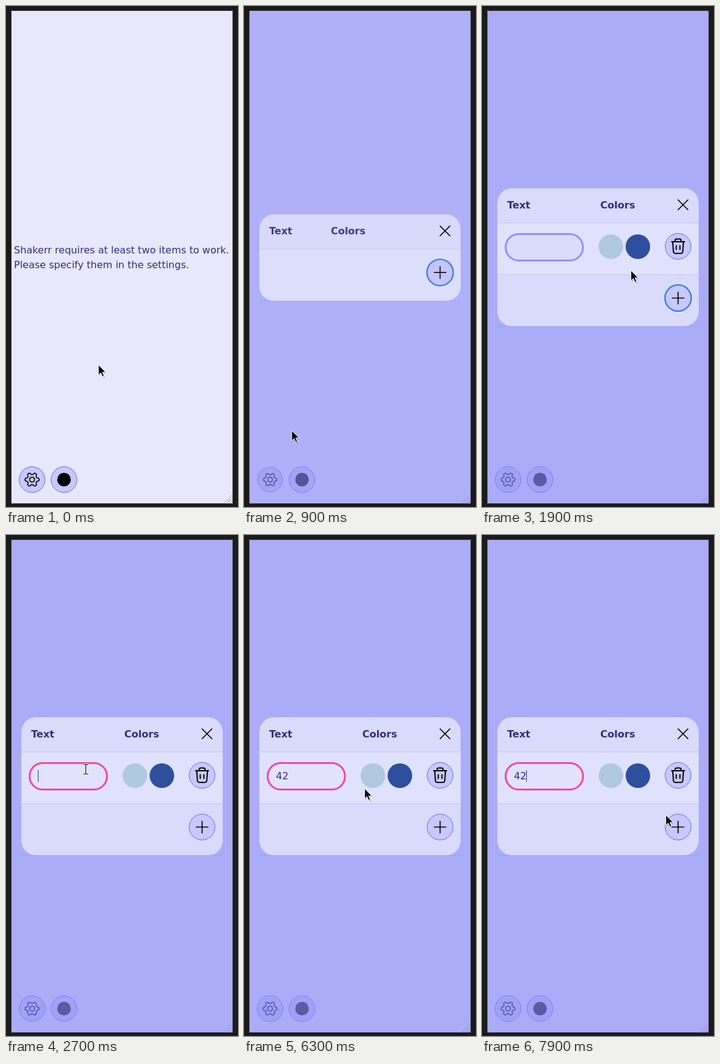
An HTML page that plays this animation: 378 px wide and 814 px high, repeating every 8000 ms.

```html
<!DOCTYPE html>
<html lang="en">
<head>
<meta charset="utf-8">
<title>Settings dialog</title>
<style>
  html, body { margin: 0; width: 100%; height: 100%; overflow: hidden; background: #1b1b1b; }
  svg { display: block; width: 100%; height: 100%; }
  text { font: 16px "DejaVu Sans", sans-serif; fill: #312e81; white-space: pre; }
  .head { font-weight: bold; }
  .btn { fill: #c7c8fd; stroke: #6366f1; }
  .icon { fill: none; stroke: #000; stroke-width: 1.7; stroke-linecap: round; stroke-linejoin: round; }
  .rule { stroke: #c3c4fa; }
  .field { fill: #dadbfd; stroke: #8e92f2; stroke-width: 3; }
  #focus { fill: #e2e2fd; stroke: #f54a9d; }
</style>
</head>
<body>
<svg viewBox="0 0 378 814">
  <defs>
    <clipPath id="card"><rect id="cardShape" x="25" width="328" rx="24"/></clipPath>
    <path id="beamShape" d="M-4-8H-1.500L0-7L1.500-8H4M0-7V7M-4 8H-1.500L0 7L1.500 8H4"/>
    <rect id="pill" x="38.500" y="370.500" width="126" height="43" rx="21.500"/>
  </defs>
  <rect width="378" height="814" fill="#1b1b1b"/>
  <rect x="8.5" y="7.5" width="361" height="801" fill="#e7e8fc" stroke="#38383b"/>

  <g id="notice">
    <text x="13" y="402">Shakerr requires at least two items to work.</text>
    <text x="13" y="426">Please specify them in the settings.</text>
  </g>
  <g id="gearBtn">
    <circle class="btn" r="21"/>
    <path id="gear" class="icon"/>
    <circle class="icon" r="4"/>
  </g>
  <g transform="translate(94.5 769.5)">
    <circle class="btn" r="21"/>
    <circle r="11" fill="#000"/>
  </g>
  <path d="M356 807l12-12M361 807l7-7M365 807l3-3" stroke="#9c9ca8" fill="none"/>
  <rect id="veil" x="9" y="8" width="360" height="800" fill="#8b8cf6"/>

  <g id="dialog">
    <path id="foot" d="M25 .5H353" stroke="#9fa1f3"/>
    <g clip-path="url(#card)">
      <rect id="back" x="25" width="328" fill="#d9dafc"/>
      <rect id="light" x="25" width="328" height="84" fill="#e0e1fc"/>
      <path id="rule1" class="rule" d="M25 .5H353"/>
      <path id="rule2" class="rule" d="M25 .5H353"/>
      <rect id="glow" x="25" width="328" fill="#fff"/>
    </g>
    <g id="header">
      <text class="head" x="41" y="33">Text</text>
      <text id="colors" class="head" y="33">Colors</text>
      <path class="icon" d="M319.500 19l16 16m0-16l-16 16"/>
    </g>
    <g id="item">
      <use href="#pill" class="field"/>
      <use href="#pill" class="field" id="focus"/>
      <text id="value" x="52" y="397"></text>
      <path id="caret" d="M.5 382V401" stroke="#312e81"/>
      <circle cx="210" cy="391" r="20" fill="#b0c8e2"/>
      <circle cx="254" cy="391" r="20" fill="#2e4f9e"/>
      <circle class="btn" cx="319.500" cy="390.500" r="21"/>
      <path class="icon" style="stroke-width:2" d="M309 383H330M314.500 383V381.500a3 3 0 0 1 3-3h4a3 3 0 0 1 3 3V383M310.800 383l1 15.500a3.500 3.500 0 0 0 3.500 3.500h8.400a3.500 3.500 0 0 0 3.500-3.500l1-15.500M316.500 389.500v6M322.500 389.500v6"/>
    </g>
    <g id="plus">
      <circle class="btn" r="21"/>
      <g id="ring" fill="none">
        <circle r="23" stroke="#fff"/>
        <circle r="21.500" stroke="#3f7fe6" stroke-width="2.600"/>
      </g>
      <path class="icon" d="M-9.500 0H9.500M0-9.500V9.500"/>
    </g>
  </g>

  <g id="arrow">
    <path d="M1 2V18.500L5 15L8 21L11 20L8 14H13Z" fill="#000" opacity=".18"/>
    <path d="M0 0V16.500L3.900 13L6.500 19L9.300 17.800L6.700 12H12Z" fill="#000" stroke="#fff" stroke-linejoin="round"/>
  </g>
  <g id="beam" fill="none">
    <use href="#beamShape" stroke="#fff" stroke-width="3.200"/>
    <use href="#beamShape" stroke="#000" stroke-width="1.200"/>
  </g>
</svg>
<script>
const LOOP = 8000, STEP = 100;
const OPEN = 744, ADD = 1700, FOCUS = 2500, TYPE = 5500;

const el = id => document.getElementById(id);
const set = (id, attrs) => { for (const k in attrs) el(id).setAttribute(k, attrs[k]); };
const show = (id, on) => set(id, { visibility: on ? 'inherit' : 'hidden' });
const move = (id, x, y, s = 1) => set(id, { transform: `translate(${x} ${y}) scale(${s})` });
const progress = (t, from, to) => Math.min(1, Math.max(0, (t - from) / (to - from)));
const smooth = p => p * p * (3 - 2 * p);
const blinkOn = (t, from, half) => (t - from) % (2 * half) < half;

// Pointer trips; bend curves the path by easing y against a steady x
const home = { x: 150, y: 582 };
const trips = [
  { from: 100, to: 500, x: 43, y: 767, bend: 0.8 },
  { from: 800, to: 1600, x: 317, y: 432, bend: 0.7 },
  { from: 1700, to: 2200, x: 130, y: 380, bend: 3 },
  { from: 5000, to: 5200, x: 136, y: 375, bend: 1 },
  { from: 5600, to: 5900, x: 196, y: 411, bend: 1 },
  { from: 6300, to: 6800, x: 236, y: 422, bend: 1 },
  { from: 6900, to: 7300, x: 226, y: 171, bend: 1 },
  { from: 7300, to: 7600, x: 215, y: 298, bend: 1 },
  { from: 7700, to: 7900, x: 299, y: 454, bend: 1 }
];

function pointerAt(t) {
  let { x, y } = home;
  for (const trip of trips) {
    const p = progress(t, trip.from, trip.to);
    x += (trip.x - x) * p;
    y += (trip.y - y) * p ** trip.bend;
  }
  return [x, y];
}

function gearPath() {
  const points = [];
  for (let i = 0; i < 90; i++) {
    const a = i * Math.PI / 45, r = 9.8 + 1.8 * Math.tanh(1.5 * Math.cos(6 * a));
    points.push((r * Math.cos(a)).toFixed(2) + ' ' + (r * Math.sin(a)).toFixed(2));
  }
  return 'M' + points.join('L') + 'Z';
}

function drawDialog(t, open) {
  const hasItem = t >= ADD;
  const height = hasItem ? 224 : 140, top = 408 - height / 2, bottom = top + height;
  const fade = open ** 1.4;
  show('dialog', open > 0);
  set('dialog', { transform: `translate(0 ${77 * (1 - open) ** 2})`, opacity: fade });
  set('glow', { opacity: 1 - fade });
  for (const id of ['cardShape', 'back', 'glow']) set(id, { y: top, height: height + 0.5 });
  set('light', { y: top + 56 });
  move('foot', 0, bottom);
  move('rule1', 0, top + 56);
  move('rule2', 0, top + 140);
  show('rule2', hasItem);
  move('header', 0, top);
  set('colors', { x: hasItem ? 192.8 : 141.4 });
  move('plus', 319.5, bottom - 45.5);
  show('ring', t < FOCUS);
  show('item', hasItem);
}

function drawField(t) {
  const text = '42'.slice(0, Math.max(0, (t - TYPE) / STEP + 1));
  const lit = text ? blinkOn(t, 5600, 500) : blinkOn(t, 2700, 1100);
  set('focus', { opacity: progress(t, FOCUS - STEP, FOCUS + 2 * STEP) });
  el('value').textContent = text;
  move('caret', 52 + Math.round(text.length * 10.18), 0);
  show('caret', t >= FOCUS && lit);
}

function draw(ms) {
  const t = Math.floor(ms % LOOP / STEP) * STEP;
  const open = smooth(progress(t, OPEN, OPEN + 188));
  show('notice', !open);
  set('veil', { opacity: 0.65 * open });
  move('gearBtn', 42.5, 769.5, t < ADD ? 1 - 0.045 * open : 1);
  drawDialog(t, open);
  drawField(t);

  const [x, y] = pointerAt(t), overField = t >= 2100 && t < 5700;
  move('arrow', x + 0.5, y + 1);
  move('beam', x, y + 0.5);
  show('arrow', !overField);
  show('beam', overField);
}

set('gear', { d: gearPath() });
const start = performance.now();
function tick() {
  draw(performance.now() - start);
  requestAnimationFrame(tick);
}
tick();
</script>
</body>
</html>
```
